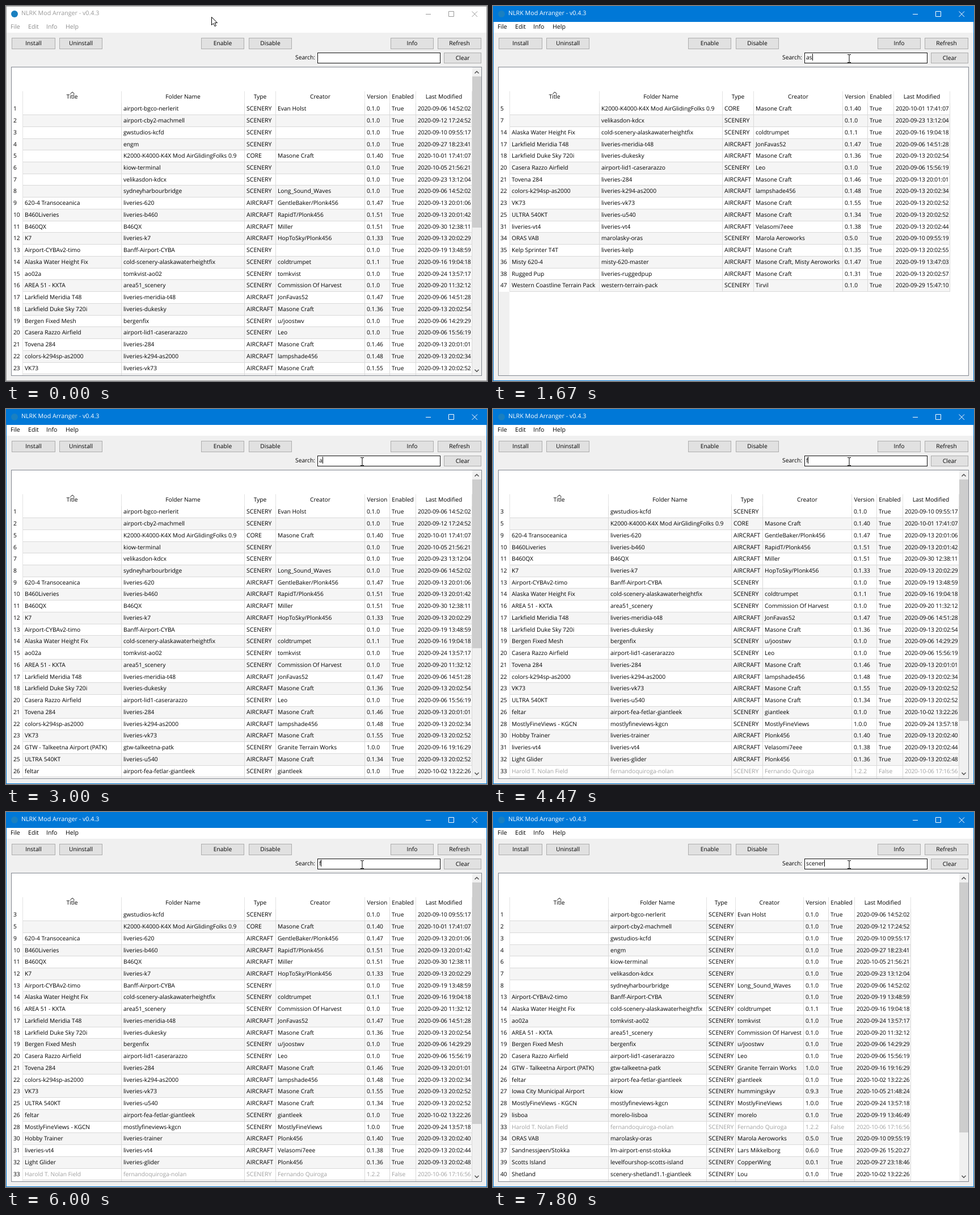
An HTML page that plays this animation: 848x660 px, repeating every 8000 ms.

```html
<!DOCTYPE html>
<html lang="en">
<head>
<meta charset="utf-8">
<title>Mod list search</title>
<style>
html, body { margin: 0; width: 100%; height: 100%; overflow: hidden; background: #f0f0f0; }
#win { position: absolute; left: 0; top: 0; width: 848px; height: 660px; overflow: hidden; background: #f0f0f0;
  font: 10.25px/21px "Open Sans", "Noto Sans", sans-serif; color: #000; white-space: pre;
  text-rendering: geometricPrecision; cursor: default; }
#win *, #frame { position: absolute; box-sizing: border-box; }
#win .flow { position: static; }
#bar { left: 0; top: 0; width: 848px; height: 28px; background: #fff; color: #999; }
#bar b { left: 27px; top: 3px; font-weight: 400; font-size: 10.7px; }
#bar i { left: 9px; top: 8px; width: 12px; height: 12px; border-radius: 50%; background: #1a80c0; }
#menu { left: 0; top: 28px; width: 848px; height: 19px; background: #fff; color: #8c8c8c; font-size: 10.6px; }
#menu span { top: -1px; }
.on #bar { background: #0078d7; color: #fff; }
.on #menu { color: #000; }
#frame { inset: 0; border: 1px solid #999; }
.on #frame { border-color: #0078d7; }
.btn { height: 20px; line-height: 18px; text-align: center; background: #e1e1e1; border: 1px solid #adadad; }
#field { left: 549px; top: 82px; width: 217px; height: 19px; background: #fff; border: 1px solid #111; line-height: 17px; padding-left: 2px; }
#win #caret { display: inline-block; width: 1px; height: 12px; background: #000; vertical-align: -2px; }
#table { left: 9px; top: 107px; width: 830px; height: 544px; background: #fff; border: 1px solid #828790; overflow: hidden; }
.cell { overflow: hidden; padding-left: 3px; border: 0 solid #d9d9d9; border-width: 0 1px 1px 0; line-height: 20px; }
.date { letter-spacing: -.17px; }
.type { font-size: 10.5px; }
.head { top: 0; height: 21px; text-align: center; border-right: 1px solid #e3e3e3; }
.alt { background: #f5f5f5; }
.off { color: #a0a0a0; }
.num { left: 3px; }
.rest { background: #f0f0f0; }
.edge { background: #e3e3e3; }
svg { left: 0; top: 0; fill: none; stroke: currentColor; }
#bar svg { width: 848px; height: 28px; }
#scroll { left: 812px; top: 0; width: 16px; height: 542px; background: #f0f0f0; }
#thumb { left: 0; top: 16px; width: 16px; background: #cdcdcd; }
#scroll svg { width: 16px; height: 542px; stroke: #505050; stroke-width: 1.5; }
#arrow, #beam { width: 14px; height: 20px; overflow: visible; }
</style>
</head>
<body>
<div id="win">
  <div id="bar"><i></i><b>NLRK Mod Arranger - v0.4.3</b>
    <svg><path d="M740 14.5h9M780.5 9.5h9v9h-9zM821.5 9.5l9.5 9.5M831 9.5l-9.5 9.5"/></svg></div>
  <div id="menu"></div>
  <span style="left:510px;top:81px">Search:</span>
  <div id="field"><span id="typed" class="flow"></span><span id="caret" class="flow"></span></div>
  <div id="table">
    <div id="grid"></div>
    <div id="scroll"><div id="thumb"></div>
      <svg><path d="M4.5 10.5L8 7l3.5 3.5M4.5 532L8 535.5l3.5-3.5"/></svg></div>
  </div>
  <div id="frame"></div>
  <svg id="arrow"><path d="M.5 .5v14l3.2-3 2.4 5.2 2.3-1-2.3-5.1h4.4z" fill="#fff" stroke="#000"/></svg>
  <svg id="beam"><path d="M-3 -6.5h2.2l.8 .7 .8-.7h2.2M0 -6v13M-3 7.5h2.2l.8-.7 .8 .7h2.2" stroke="#000"/></svg>
</div>
<script>
const LOOP = 8000;
const $ = id => document.getElementById(id);

// title | folder | type | creator | version | modified (2020), "-" marks a disabled mod
const mods = `
|airport-bgco-nerlerit|S|Evan Holst|0.1.0|09-06 14:52:02
|airport-cby2-machmell|S||0.1.0|09-12 17:24:52
|gwstudios-kcfd|S||0.1.0|09-10 09:55:17
|engm|S||0.1.0|09-27 18:23:41
|K2000-K4000-K4X Mod AirGlidingFolks 0.9|C|Masone Craft|0.1.40|10-01 17:41:07
|kiow-terminal|S||0.1.0|10-05 21:56:21
|velikasdon-kdcx|S||0.1.0|09-23 13:12:04
|sydneyharbourbridge|S|Long_Sound_Waves|0.1.0|09-06 14:52:02
620-4 Transoceanica|liveries-620|A|GentleBaker/Plonk456|0.1.47|09-13 20:01:06
B460Liveries|liveries-b460|A|RapidT/Plonk456|0.1.51|09-13 20:01:42
B460QX|B46QX|A|Miller|0.1.51|09-30 12:38:11
K7|liveries-k7|A|HopToSky/Plonk456|0.1.33|09-13 20:02:29
Airport-CYBAv2-timo|Banff-Airport-CYBA|S||0.1.0|09-19 13:48:59
Alaska Water Height Fix|cold-scenery-alaskawaterheightfix|S|coldtrumpet|0.1.1|09-16 19:04:18
ao02a|tomkvist-ao02|S|tomkvist|0.1.0|09-24 13:57:17
AREA 51 - KXTA|area51_scenery|S|Commission Of Harvest|0.1.0|09-20 11:32:12
Larkfield Meridia T48|liveries-meridia-t48|A|JonFavas52|0.1.47|09-06 14:51:28
Larkfield Duke Sky 720i|liveries-dukesky|A|Masone Craft|0.1.36|09-13 20:02:54
Bergen Fixed Mesh|bergenfix|S|u/joostwv|0.1.0|09-06 14:29:29
Casera Razzo Airfield|airport-lid1-caserarazzo|S|Leo|0.1.0|09-06 15:56:19
Tovena 284|liveries-284|A|Masone Craft|0.1.46|09-13 20:01:01
colors-k294sp-as2000|liveries-k294-as2000|A|lampshade456|0.1.48|09-13 20:02:34
VK73|liveries-vk73|A|Masone Craft|0.1.55|09-13 20:02:52
GTW - Talkeetna Airport (PATK)|gtw-talkeetna-patk|S|Granite Terrain Works|1.0.0|09-16 19:16:29
ULTRA 540KT|liveries-u540|A|Masone Craft|0.1.34|09-13 20:02:52
feltar|airport-fea-fetlar-giantleek|S|giantleek|0.1.0|10-02 13:22:26
Iowa City Municipal Airport|kiow|S|hummingskyv|0.9.3|10-05 21:48:24
MostlyFineViews - KGCN|mostlyfineviews-kgcn|S|MostlyFineViews|1.0.0|09-24 13:57:18
lisboa|morelo-lisboa|S|morelo|0.1.0|09-19 13:46:49
Hobby Trainer|liveries-trainer|A|Plonk456|0.1.40|09-13 20:02:40
liveries-vt4|liveries-vt4|A|Velasomi7eee|0.1.38|09-13 20:02:44
Light Glider|liveries-glider|A|Plonk456|0.1.36|09-13 20:02:48
Harold T. Nolan Field|fernandoquiroga-nolan|S|Fernando Quiroga|1.2.2|10-06 17:16:56|-
ORAS VAB|marolasky-oras|S|Marola Aeroworks|0.5.0|09-10 09:55:19
Kelp Sprinter T4T|liveries-kelp|A|Masone Craft|0.1.35|09-13 20:02:55
Misty 620-4|misty-620-master|A|Masone Craft, Misty Aeroworks|0.1.47|09-19 13:47:03
Sandnessjøen/Stokka|lm-airport-enst-stokka|S|Lars Mikkelborg|0.6.0|09-26 15:20:27
Rugged Pup|liveries-ruggedpup|A|Masone Craft|0.1.31|09-13 20:02:57
Scotts Island|levelfourshop-scotts-island|S|CopperWing|0.0.1|09-27 23:18:46
Shetland|scenery-shetland1.1-giantleek|S|Lou|0.1.0|10-02 13:22:26
sydneytower|scenery-Sydney-Tower-UpLor|S|UpLor|0.1.0|09-06 14:30:02
Talagi - Arkhangelsk|mitrov-ulaa|S|Mitrov_K|0.1.0|09-19 13:46:44
Tandem 12|liveries-tandem|A|Plonk456|0.1.33|09-13 20:02:56
Tingwall|airport-eget-tingwall-giantleek|S|Lou|0.1.0|10-02 13:22:25
Twin Rotor|liveries-rotor|A|Plonk456|0.1.32|09-13 20:02:58
USA MO - Missouri River Terrain Fix|tirvil-scenery-usa-mo-river-terrain|S|Tirvil|0.1.0|09-29 15:46:51|-
Western Coastline Terrain Pack|western-terrain-pack|S|Tirvil|0.1.0|09-29 15:47:10
Wick Airport|airport-egpc-wick-giantleek|S|Lou|0.1.0|10-02 13:22:25
`.slice(1, -1).split("\n").map((line, i) => {
  const [title, folder, type, creator, version, date, off] = line.split("|");
  const kind = { S: "SCENERY", A: "AIRCRAFT", C: "CORE" }[type];
  const cells = [title, folder, kind, creator, version, off ? "False" : "True", "2020-" + date];
  return { id: i + 1, off, cells, key: cells.join("|").toLowerCase() };
});

const heads = ["Title", "Folder Name", "Type", "Creator", "Version", "Enabled", "Last Modified"];
const cellClass = ["", "", "type", "", "", "", "date"];

// time, text in the field, filter in force when it lags behind the text
const steps = [
  [0, ""], [1470, "a"], [1670, "as"], [1730, "aso"], [1870, "ason"], [2000, "asone"],
  [2530, "ason"], [2670, "aso"], [2800, "as"], [3000, "a"], [3070, ""],
  [4200, "f", ""], [4470, "f"], [4870, "fa"], [4930, "fal"], [5070, "fals"], [5130, "false"],
  [5530, "fals"], [5670, "fal"], [5800, "fa"], [6000, "f"], [6130, ""],
  [7200, "s"], [7400, "sc"], [7530, "sce"], [7670, "scen"], [7730, "scene"], [7800, "scener"]
];
const caretOff = [[0, 800], [1330, 1470], [3800, 4200], [6870, 7200]];
const ACTIVE = 800;

// column widths follow the longest visible text
function widths(q) {
  const first =
    q === "as" ? [158, 217, 55, 157] :
    q.startsWith("aso") ? [119, 217, 55, 157] :
    q === "fa" ? [174, 172, 55, 92] :
    q.startsWith("fal") ? [174, 172, 50, 92] :
    q.startsWith("sc") ? [174, 173, 51, 120] : [174, 217, 55, 157];
  return [...first, 44, 46, 99];
}

const box = (cls, x, y, w, h, text = "") =>
  `<div class="${cls}" style="left:${x}px;top:${y}px;width:${w}px;height:${h}px">${text}</div>`;

const rowTop = i => Math.round(21.3 + 20.74 * i);

function drawTable(q) {
  const rows = mods.filter(m => m.key.includes(q));
  const cols = widths(q);
  const end = rowTop(rows.length);
  let html = end < 542 ? box("rest", 0, end, 19, 542 - end) : "";
  html += box("head", 0, 0, 20, 21);
  let x = 20;
  cols.forEach((w, c) => { html += box("head", x, 0, w, 21, heads[c]); x += w; });
  const mid = 20 + cols[0] / 2;
  html += `<svg width="200" height="8" stroke="#666"><path d="M${mid - 3.5} 4.5l3.5-3 3.5 3"/></svg>`;
  rows.slice(0, 26).forEach((m, i) => {
    const y = rowTop(i), h = rowTop(i + 1) - y;
    html += `<span class="num" style="top:${y}px;line-height:20px">${m.id}</span>`;
    html += box("edge", 19, y, 1, h);
    let left = 20;
    cols.forEach((w, c) => {
      const cls = `cell ${cellClass[c]}${i % 2 ? " alt" : ""}${m.off ? " off" : ""}`;
      html += box(cls, left, y, w, h, m.cells[c]);
      left += w;
    });
  });
  $("grid").innerHTML = html;
  $("scroll").style.display = rows.length > 25 ? "" : "none";
  $("thumb").style.height = 510 * 25 / rows.length + "px";
}

function pointer(t) {
  if (t < 70) return [362, 19];
  if (t < 270) return null;
  const p = Math.min(1, (t - 270) / 530);
  const e = p * p * (3 - 2 * p);
  return [385 + 243 * e, 4 + 88 * e ** 1.2];
}

function place(el, pos) {
  el.style.display = pos ? "" : "none";
  if (pos) el.style.transform = `translate(${Math.round(pos[0])}px,${Math.round(pos[1])}px)`;
}

let shown = null;
function render(t) {
  const [, text, filter = text] = steps.findLast(s => s[0] <= t);
  if (filter !== shown) drawTable(shown = filter);
  $("typed").textContent = text;
  $("caret").style.visibility = caretOff.some(([a, b]) => t >= a && t < b) ? "hidden" : "";
  $("win").className = t >= ACTIVE ? "on" : "";
  const pos = pointer(t);
  const inField = pos && pos[0] > 549 && pos[1] > 81;
  place($("arrow"), inField ? null : pos);
  place($("beam"), inField ? pos : null);
}

$("menu").innerHTML = [["File", 8], ["Edit", 39], ["Info", 71], ["Help", 105]]
  .map(([s, x]) => `<span style="left:${x}px">${s}</span>`).join("");
$("frame").insertAdjacentHTML("beforebegin", [
  ["Install", 10, 56, 77], ["Uninstall", 94, 56, 76], ["Enable", 344, 56, 76], ["Disable", 428, 56, 76],
  ["Info", 678, 56, 76], ["Refresh", 761, 56, 77], ["Clear", 772, 82, 66]
].map(([s, x, y, w]) => box("btn", x, y, w, y > 80 ? 19 : 20, s)).join(""));

function tick() {
  render(performance.now() % LOOP);
  requestAnimationFrame(tick);
}
tick();
</script>
</body>
</html>
```
